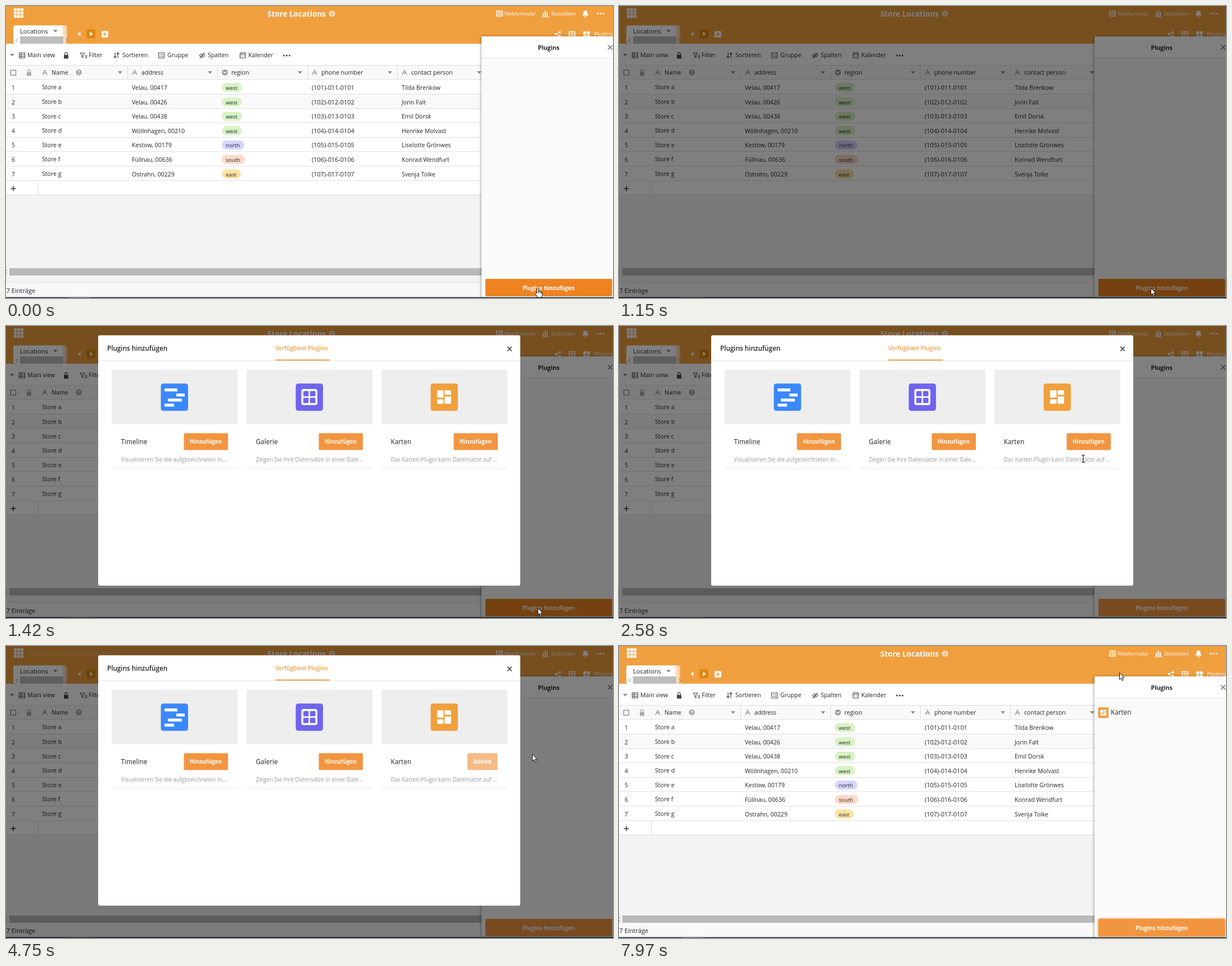
Write an HTML page that moves like this. It is 1080 by 519 pixels and loops after 8000 ms.

```html
<!DOCTYPE html>
<html lang="de">
<head>
<meta charset="utf-8">
<title>Plugins hinzufügen</title>
<style>
  html, body { margin: 0; width: 100%; height: 100%; overflow: hidden; background: #fff; }
  svg { display: block; width: 100%; height: 100%; font-family: "Open Sans", "Noto Sans", sans-serif; }
  text { white-space: pre; }
</style>
</head>
<body>
<svg id="stage" viewBox="0 0 1080 519" preserveAspectRatio="none"></svg>
<script>
const LOOP = 8000;
const ORANGE = '#f09f3f', BUTTON = '#f29540', HOVER = '#ee8320', INK = '#212529', GREY = '#999';

// Drawing helpers
const rect = (x, y, w, h, fill, r = 0, more = '') =>
  `<rect x="${x}" y="${y}" width="${w}" height="${h}" rx="${r}" fill="${fill}" ${more}/>`;
const text = (x, y, s, size = 10.6, fill = INK, weight = 400, more = '') =>
  `<text x="${x}" y="${y}" font-size="${size}" fill="${fill}" font-weight="${weight}" ${more}>${s}</text>`;
const mid = (x, y, s, size, fill, weight) => text(x, y, s, size, fill, weight, 'text-anchor="middle"');
const line = (d, color = '#555', w = 1.2) =>
  `<path d="${d}" fill="none" stroke="${color}" stroke-width="${w}" stroke-linecap="round" stroke-linejoin="round"/>`;
const shape = (d, fill = '#555') => `<path d="${d}" fill="${fill}"/>`;
const dot = (x, y, r, fill) => `<circle cx="${x}" cy="${y}" r="${r}" fill="${fill}"/>`;
const down = (x, y, fill = '#888') => shape(`M${x - 4} ${y - 2}h8l-4 4.5z`, fill);
const cross = (x, y, r, color, w) => line(`M${x - r} ${y - r}l${2 * r} ${2 * r}m0 ${-2 * r}l${-2 * r} ${2 * r}`, color, w);
const group = (id, body, more = '') => `<g id="${id}" ${more}>${body}</g>`;
const range = n => [...Array(n).keys()];
const dots = (x, y, fill) => range(3).map(i => dot(x + 5 * i, y, 1.6, fill)).join('');
const lock = (x, y, fill) => rect(x - 4, y - 1, 8, 6.5, fill, 1) + line(`M${x - 2.3} ${y - 1}v-2a2.3 2.3 0 0 1 4.6 0v2`, fill, 1.3);
const letterA = (x, y) => line(`M${x - 4} ${y + 4}l4 -8l4 8m-6.5 -3h5`, GREY, 1.4);
const sheet = (x, y, color) =>
  line(`M${x - 5} ${y - 4.5}h10v9h-10zM${x - 2} ${y - 1.5}h4.5m-4.5 3h4.5`, color, 1.6);
const blocks = (x, y, k) =>
  rect(x - 12.5 * k, y - 12 * k, 11.5 * k, 13 * k, '#fff', k) + rect(x - 12.5 * k, y + 4 * k, 11.5 * k, 8 * k, '#fff', k) +
  rect(x + k, y - 12 * k, 11.5 * k, 8 * k, '#fff', k) + rect(x + k, y - k, 11.5 * k, 13 * k, '#fff', k);

function topBar() {
  const grid = range(9).map(i => rect(14 + i % 3 * 6, 4 + Math.floor(i / 3) * 6, 5, 5, '#fff', .5)).join('');
  return rect(0, 0, 1080, 67, ORANGE) + grid +
    text(465, 19, 'Store Locations', 13.5, '#fff', 700) +
    dot(580, 13.5, 5.6, '#f8dcb8') + rect(579.3, 12.5, 1.5, 4, ORANGE) + rect(579.3, 10, 1.5, 1.5, ORANGE) +
    sheet(878, 13.5, '#fff') + text(887, 17, 'Webformular', 9, '#fff') +
    rect(955, 12, 2, 6, '#fff') + rect(958.5, 8, 2, 10, '#fff') + rect(962, 11, 2, 7, '#fff') +
    rect(954, 18.5, 12, 1.3, '#fff') + text(970, 17, 'Statistiken', 9, '#fff') +
    shape('M1025.5 17c2-2 1-8.5 5.5-9c4.5 .5 3.5 7 5.5 9zM1029 18h4a2 2 0 0 1-4 0z', '#fff') +
    dots(1053, 13.5, '#fff') +
    rect(13, 34.5, 96, 32.5, 'url(#tab)', 4) + rect(25, 54, 77, 13, '#bdbdbd') +
    text(25, 49, 'Locations', 11.2) + down(88, 44.5) +
    line('M20.5 58l-3 3l3 3M107 58l3 3l-3 3', '#777', 1) +
    shape('M132.5 45.5v8l-5-4z', '#fff') + rect(143, 41.5, 16, 16, '#e0870f', 2) + shape('M149.5 45.5v8l5-4z', '#fff') +
    rect(170, 44.5, 12, 11.5, '#fff', 2) + line('M173 50.3h6m-3-3v6', ORANGE, 1.6) +
    dot(985.5, 46.5, 1.9, '#fff') + dot(978, 50, 1.9, '#fff') + dot(985.5, 53.5, 1.9, '#fff') +
    line('M985.5 46.5l-7.5 3.5l7.5 3.5', '#fff') + sheet(1007, 50, '#fff') +
    [[1027, 45], [1033.5, 45], [1027, 51], [1033.5, 51]].map(p => rect(...p, 5.3, 5, '#fff', 1)).join('') +
    text(1046, 54, 'Plugins', 10.1, '#fff');
}

function toolbar() {
  const items = [[38, 'Main view'], [147, 'Filter'], [207, 'Sortieren'], [287, 'Gruppe'], [359, 'Spalten'], [431, 'Kalender']];
  return down(11, 87) + line('M23.5 83h10v9.5h-10zM23.5 86h10m-10 3.3h10m-6.5-6v9') + lock(107, 88, '#444') +
    line('M132 83.5h8l-3 4v4.5l-2-1.3v-3.2zM141 87.5h3m-3 2.3h3m-3 2.3h3') +
    line('M194 83v9l-2-2m2 2l2-2M199 92v-9l-2 2m2-2l2 2', '#444') +
    line('M271.5 83h10v9.5h-10zM274 86h1m1.5 0h3m-5.5 3.3h1m1.5 0h3') +
    line('M344 88c3-4 7-4 10 0c-3 4-7 4-10 0zM345 92.5l8-9') + dot(349, 88, 1.6, '#555') +
    line('M416.5 83.5h9.5v9h-9.5zM416.5 86h9.5m-7-4v2m4.5-2v2M419 89h1m2.5 0h1') +
    items.map(([x, s]) => text(x, 91, s)).join('') + dots(494.5, 88, '#444');
}

const people = ['Tilda Brenkow', 'Jorin Falt', 'Emil Dorsk', 'Henrike Molvast', 'Liselotte Grönwes', 'Konrad Wendfurt', 'Svenja Tolke'];
const places = ['Velau, 00417', 'Velau, 00426', 'Velau, 00438', 'Wöllnhagen, 00210', 'Kestow, 00179', 'Füllnau, 00636', 'Ostrahn, 00229'];
const regions = { west: ['#d9f3c4', 36], north: ['#d6d4ff', 40], south: ['#ffd9c9', 41], east: ['#ffe2a3', 34] };
const regionOf = ['west', 'west', 'west', 'west', 'north', 'south', 'east'];

function table() {
  const top = 131.3, step = 25.6, rule = y => rect(0, Math.round(y) - 1, 846, 1, '#e0e0e0');
  let out = rect(0, 105, 846, 26, '#f9f9f9') + rect(0, 105, 846, 1, '#ddd') + rect(0, 336, 846, 156, '#f3f3f3') +
    rect(0, top + step, 846, step, '#f9f9f9');
  out += range(9).map(i => rule(top + step * i)).join('');
  out += [217, 377, 537, 697].map(x => rect(x - 1, 105, 1, 26, '#ddd')).join('') + rect(57, 311, 1, 24, '#ddd');
  out += [203, 363, 523, 683, 842].map(x => down(x, 118)).join('') + [69, 229, 549, 709].map(x => letterA(x, 118)).join('');
  out += rect(8.5, 114, 9, 9, '#fff', 0, 'stroke="#666"') + lock(41, 118.5, '#aaa');
  out += dot(129.5, 118, 5.3, '#aaa') + mid(129.5, 121, '?', 8, '#fff', 700);
  out += dot(389.5, 118, 5.3, '#999') + line('M387 117l2.5 2.5l2.5-2.5', '#fff', 1.4);
  out += [[81, 'Name'], [241, 'address'], [401, 'region'], [561, 'phone number'], [721, 'contact person']]
    .map(([x, s]) => text(x, 122, s)).join('');
  people.forEach((person, i) => {
    const y = 149 + step * i, name = regionOf[i], [color, w] = regions[name], n = i + 1;
    out += text(10, y, n, 10.4) + text(64, y - .6, 'Store ' + 'abcdefg'[i]) + text(224, y, places[i]) +
      rect(384, y - 12.2, w, 16, color, 8) + text(391, y, name, 9.7) +
      text(544, y, `(10${n})-01${n}-010${n}`, 10.9) + text(704, y, person, 10.5);
  });
  return out + line('M9 324.5h8m-4-4v8', '#333', 1.4);
}

function footer() {
  return rect(0, 492, 846, 26, '#f8f8f8') + rect(0, 491, 846, 1, '#e2e2e2') + text(0.5, 510, '7 Einträge', 11.1) +
    group('bar', rect(6, 466, 840, 13, '#b9b9b9') + rect(0, 469, 1.5, 2, '#999') + rect(0, 474, 1.5, 2, '#999'));
}

function panel() {
  return rect(846, 54, 240, 470, '#fafafa', 3, 'filter="url(#soft)"') + rect(846, 54, 240, 38.5, '#fff', 3) +
    rect(846, 92, 240, 1, '#e4e4e4') + text(946.5, 78, 'Plugins', 10.6, INK, 700) + cross(1075, 73.5, 3.8, '#777', 1.5) +
    group('entry', rect(852.5, 109, 18.5, 19, ORANGE, 2) + blocks(861.7, 118.5, .43) + text(875, 122, 'Karten', 11.7)) +
    rect(852.5, 484.5, 226.5, 32.5, 'none', 4, 'id="ring" stroke="#f8c691" stroke-width="2.5"') +
    rect(853, 485, 225.5, 31, BUTTON, 2, 'id="open"') + mid(965.5, 504.5, 'Plugins hinzufügen', 9.8, '#fff', 700);
}

const cards = [
  [188, 'Timeline', 'Visualisieren Sie die aufgezeichneten In...', '#3b88fd'],
  [428, 'Galerie', 'Zeigen Sie Ihre Datensätze in einer Gale...', '#7064ee'],
  [668, 'Karten', 'Das Karten-Plugin kann Datensätze auf ...', '#f0a03c']
];
const glyphs = [
  [[282, 111, 23], [303, 120, 15], [288, 129, 25], [282, 138, 17]].map(([x, y, w]) => rect(x, y, w, 5.3, '#fff', 1)).join(''),
  rect(525.5, 112, 28.5, 28.5, '#fff', 4) +
    range(4).map(i => rect(529 + i % 2 * 12, 115.5 + (i >> 1) * 12, 9.5, 9.5, '#7064ee', 1.5)).join(''),
  blocks(779.5, 126.3, 1)
];

function dialog() {
  let out = rect(164, 16.5, 751, 445, '#fff', 3) + text(180, 44, 'Plugins hinzufügen', 11.7, INK, 600) +
    text(479, 43, 'Verfügbare Plugins', 10.3, ORANGE, 600) + rect(164, 61, 751, 1, '#e8e8e8') +
    rect(479, 59.5, 97, 2, ORANGE) + group('close', cross(896, 40.5, 3.3, 'currentColor', 1.9));
  cards.forEach(([x, title, info, color], i) => {
    out += rect(x, 77.5, 224, 97, '#eee') + group('icon' + i, rect(x + 87.5, 102.3, 48.5, 48.5, color, 4.5) + glyphs[i]) +
      text(x + 16.5, 210, title, 11.8) + text(x + 16.5, 241, info, 9.9, GREY) + rect(x, 252.5, 224, 1, '#e8e8e8');
    const button = rect(x + 128.5, 190.5, 78.5, 30, BUTTON, 2, `id="add${i}"`) + mid(x + 167.5, 209.3, 'Hinzufügen', 9.95, '#fff', 700);
    out += i < 2 ? button : group('add', rect(795.5, 189.5, 80.5, 32, 'none', 3, 'id="addRing" stroke="#f8c691" stroke-width="2"') + button);
  });
  return out + group('added', rect(821, 190.5, 53.5, 30, '#f6ba84', 2) + mid(847.7, 209.3, 'Added', 10.1, '#fff', 700));
}

const edge = 'fill="#fff" stroke="#111" stroke-width="1" stroke-linejoin="round"';
const pointers =
  group('arrow', `<path d="M.5 .5V12.5L3.2 10L5.2 14.5L7.2 13.6L5.2 9.3H8.8Z" ${edge}/>`) +
  group('hand', `<path d="M-1.5 10V1.5a1.5 1.5 0 0 1 3 0V6.5a1.4 1.4 0 0 1 2.5 .3a1.4 1.4 0 0 1 2.4 .6a1.2 1.2 0 0 1 1.8 1V12c0 2-1 3-1.5 5H-.5C-1 14.5-3 13-4.5 10.3a1.3 1.3 0 0 1 2-1.5zM1.5 6.5v3m2.6-2.5v2.7m2.4-2v2.3" ${edge}/>`) +
  group('beam', line('M-2.5 -6.5h1.5l1 1l1-1h1.5M-2.5 6.5h1.5l1-1l1 1h1.5M0 -5.5v11', '#222', 1.2));

const stage = document.getElementById('stage');
stage.innerHTML = `<defs>
  <linearGradient id="tab"><stop offset=".88" stop-color="#fff"/><stop offset="1" stop-color="#f6c48a"/></linearGradient>
  <filter id="soft" x="-10%" y="-10%" width="120%" height="120%"><feDropShadow dx="-1" dy="0" stdDeviation="2" flood-opacity=".35"/></filter>
  </defs>` +
  rect(0, 0, 1080, 519, '#fff') + topBar() + toolbar() + table() + footer() + panel() +
  rect(0, 517.5, 1080, 1.5, '#17303f') + rect(112, 517.5, 38, 1.5, '#66747d') +
  group('saved', text(42, 17, 'Alle Änderungen sind gespeichert', 9.5, '#fff'), 'opacity=".3"') +
  rect(0, 0, 1080, 519, '#000', 0, 'id="dim"') + group('dialog', dialog()) + group('pointer', pointers);

const el = {};
stage.querySelectorAll('[id]').forEach(node => el[node.id] = node);

const ramp = (t, a, b) => Math.min(1, Math.max(0, (t - a) / (b - a)));
const easeOut = p => 1 - (1 - p) ** 2;
const mix = (a, b, p) => a + (b - a) * p;
const within = (t, a, b) => t >= a && t < b;
const show = (id, on) => el[id].setAttribute('display', on ? 'inline' : 'none');
const set = (id, name, value) => el[id].setAttribute(name, value);

function blend(a, b, p) {
  const part = (c, i) => parseInt(c.slice(i, i + 2), 16);
  return `rgb(${[1, 3, 5].map(i => Math.round(mix(part(a, i), part(b, i), p)))})`;
}

// Pointer path: time, x, y
const path = [
  [0, 946, 501], [1580, 946, 501], [1890, 819, 412], [2050, 819, 412], [2270, 819, 303], [2380, 819, 303],
  [2580, 826, 236], [2660, 826, 236], [2850, 825, 217], [3210, 822, 214], [3290, 822, 212], [4340, 822, 212],
  [4750, 936, 192], [5150, 936, 192], [5460, 905, 135], [5800, 905, 135], [6090, 886, 74], [6260, 886, 74],
  [6480, 890, 53], [6560, 890, 53], [6810, 888, 38], [7119, 888, 38], [7120, 884, 38], [7270, 884, 38],
  [7590, 890, 45], [7969, 890, 45], [7970, 890, 47], [LOOP, 890, 47]
];

function pointerAt(t) {
  const i = path.findIndex(p => p[0] > t), a = path[i - 1], b = path[i], p = ramp(t, a[0], b[0]);
  return [mix(a[1], b[1], p), mix(a[2], b[2], p)];
}

function pointerKind(t) {
  if (t < 1020 || within(t, 2720, 4420) || within(t, 6400, 7400)) return 'hand';
  return within(t, 2520, 2720) ? 'beam' : 'arrow';
}

function draw(t) {
  const closing = t > 7000;
  const added = t >= 4420;
  set('dim', 'opacity', .5 * (closing ? 1 - ramp(t, 7240, 7570) : ramp(t, 1000, 1130)));
  set('dialog', 'opacity', closing ? 1 - ramp(t, 7230, 7430) : ramp(t, 1180, 1305));
  const lift = closing ? ramp(t, 7230, 7530) : 1 - easeOut(ramp(t, 1279, 1420));
  set('dialog', 'transform', `translate(0 ${-49 * lift})`);
  show('dialog', within(t, 1180, 7430));
  show('icon1', t >= 1340);

  set('open', 'fill', blend(HOVER, BUTTON, ramp(t, 1640, 1860)));
  set('ring', 'opacity', closing ? ramp(t, 7400, 7560) : ramp(t, 400, 560) - ramp(t, 770, 870));
  set('add2', 'fill', blend(BUTTON, HOVER, ramp(t, 2700, 2850)));
  set('addRing', 'opacity', ramp(t, 3650, 3800));
  show('add', !added);
  show('added', added);
  show('entry', added);
  show('saved', within(t, 4520, 5300));
  set('bar', 'transform', `translate(0 ${t >= 4480 ? 13 : 0})`);
  set('close', 'color', t >= 6400 ? '#111' : '#555');

  const kind = pointerKind(t);
  ['arrow', 'hand', 'beam'].forEach(id => show(id, id === kind));
  set('pointer', 'transform', `translate(${pointerAt(t)})`);
}

function tick() {
  draw(performance.now() % LOOP);
  requestAnimationFrame(tick);
}
tick();
</script>
</body>
</html>
```
